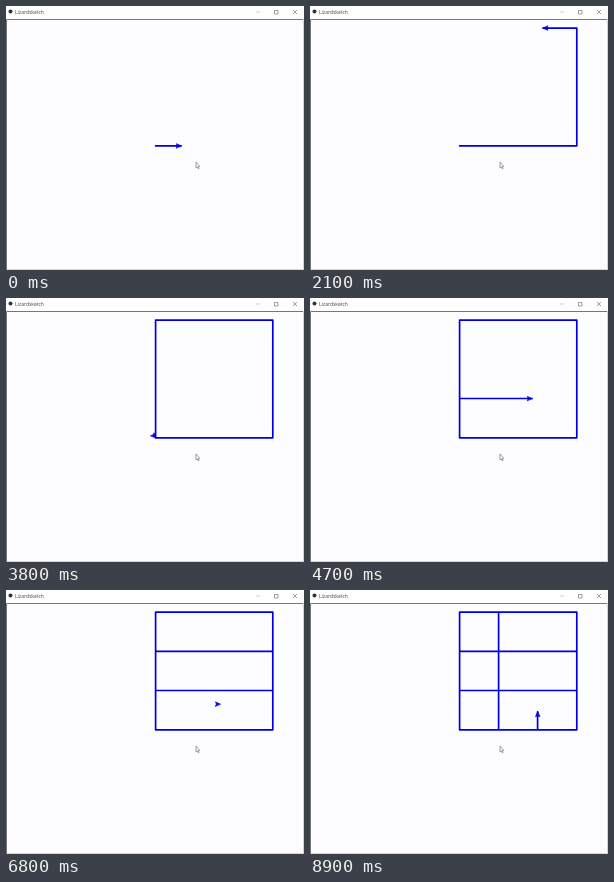
Write an HTML page that moves like this. It is 298x264 px and loops after 9000 ms.

```html
<!DOCTYPE html>
<html lang="en">
<head>
<meta charset="utf-8">
<title>Turtle grid</title>
<style>
  html, body { margin: 0; width: 100%; height: 100%; overflow: hidden; background: #fff; }
  svg { display: block; }
  text { font: 5px "Open Sans", "Noto Sans", sans-serif; fill: #444; }
</style>
</head>
<body>
<svg width="298" height="264" viewBox="0 0 298 264" fill="none">
  <!-- window -->
  <rect width="298" height="264" fill="#fefefe"/>
  <rect y="13" width="298" height="251" fill="#fdfcfe"/>
  <path d="M297.5 13V264M0 263.5H298" stroke="#d4d4d6"/>
  <path d="M.5 264V13.5H297" stroke="#77777b"/>
  <circle cx="4.5" cy="5.5" r="2" fill="#333"/>
  <text x="9" y="7.6">Lizardsketch</text>
  <path d="M250 6H254" stroke="#bbb" stroke-width=".7"/>
  <path d="M268.5 4.5H272V8H268.5ZM287 4L291 8M291 4L287 8" stroke="#777" stroke-width=".7"/>

  <!-- drawing -->
  <g stroke="#0000dc" stroke-linecap="round" stroke-linejoin="round">
    <path id="trail" stroke-width="1.7"/>
    <path id="turtle" d="M0 0L-4.8 -2.1L-3.8 0L-4.8 2.1Z" fill="#0000dc" stroke-width=".7"/>
  </g>

  <!-- mouse pointer -->
  <path d="M190 156V162L191.3 160.8L192.2 162.8L193.1 162.4L192.2 160.4H193.8Z" fill="#fff" stroke="#666" stroke-width=".6"/>
</svg>
<script>
const LOOP = 9000, STEP = 100;
const [x0, x1, x2, x3] = [149.6, 188.6, 227.6, 266.8];
const [y0, y1, y2, y3] = [139.8, 100.5, 61.3, 22.2];

// Each stop: time reached (ms), x, y, heading (degrees), pen down on the way
const stops = [
  [-139, x0, y0, 0, 0],
  [500, x3, y0, 0, 1],
  [770, x3, y0, 90, 0],
  [1610, x3, y3, 90, 1],
  [1890, x3, y3, 180, 0],
  [2620, x0, y3, 180, 1],
  [2950, x0, y3, 270, 0],
  [3660, x0, y0, 270, 1],
  [3960, x0, y0, 360, 0],
  [4230, x0, y1, 360, 0],
  [4990, x3, y1, 360, 1],
  [5660, x0, y2, 360, 0],
  [6370, x3, y2, 360, 1],
  [7010, x1, y0, 360, 0],
  [7310, x1, y0, 450, 0],
  [8115, x1, y3, 450, 1],
  [8790, x2, y0, 450, 0],
  [9510, x2, y3, 450, 1]
];

const trail = document.getElementById("trail");
const turtle = document.getElementById("turtle");

function draw(t) {
  let path = "", pose;
  for (let i = 1; i < stops.length && stops[i - 1][0] <= t; i++) {
    const a = stops[i - 1], b = stops[i];
    const k = Math.min(1, (t - a[0]) / (b[0] - a[0]));
    pose = [1, 2, 3].map(j => a[j] + (b[j] - a[j]) * k);
    if (b[4]) path += `M${a[1]} ${a[2]}L${pose[0]} ${pose[1]}`;
  }
  const [x, y, heading] = pose;
  trail.setAttribute("d", path);
  turtle.setAttribute("transform", `translate(${x} ${y}) rotate(${-heading})`);
}

const start = performance.now();
function tick() {
  const t = (performance.now() - start) % LOOP;
  draw(Math.floor(t / STEP) * STEP);
  requestAnimationFrame(tick);
}
tick();
</script>
</body>
</html>
```
